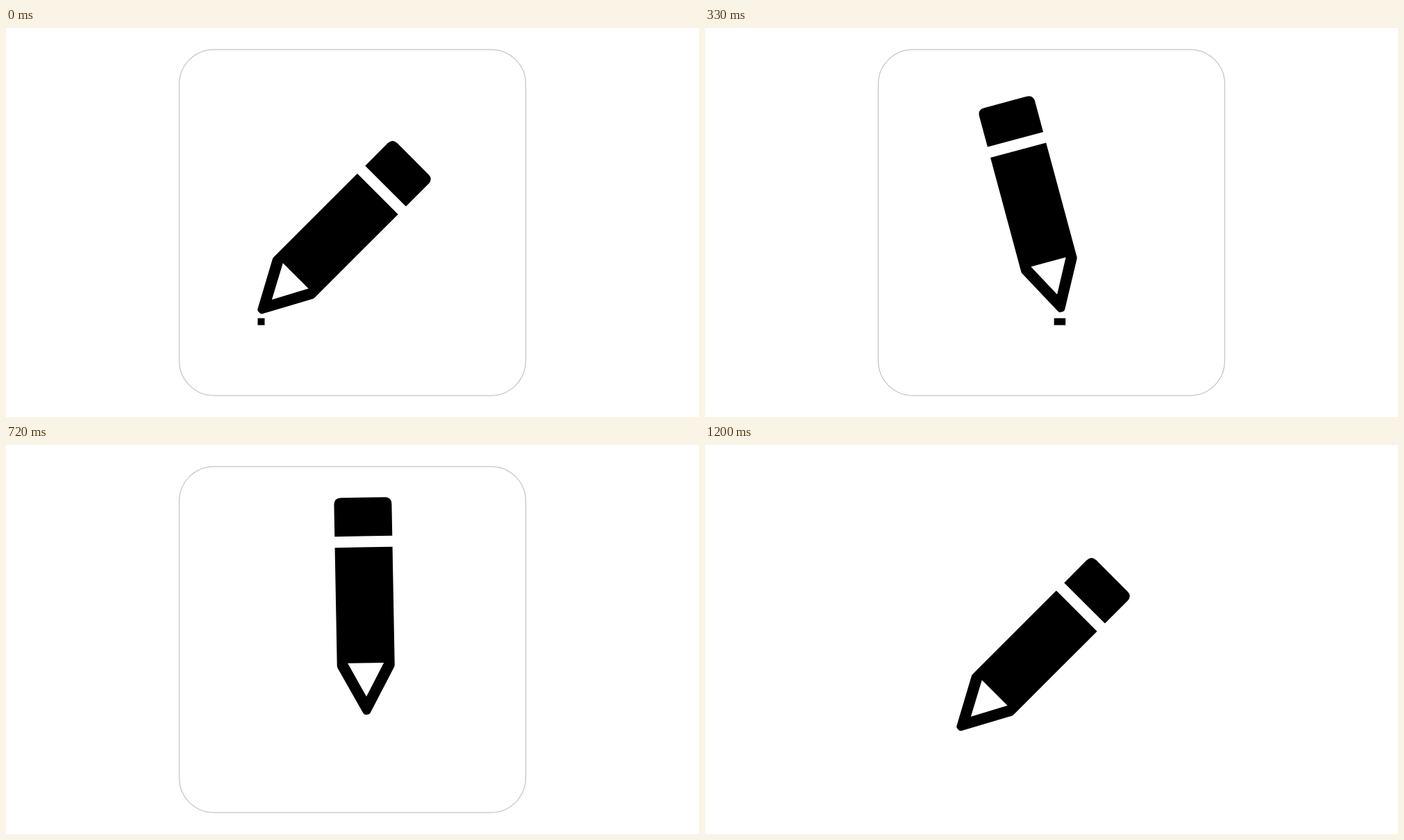
Write an HTML page that moves like this. It is 998 by 561 pixels and loops after 3150 ms.

```html
<!DOCTYPE html>
<html lang="en">
<head>
<meta charset="utf-8">
<title>Pencil</title>
<style>
  html, body { margin: 0; width: 100%; height: 100%; overflow: hidden; background: #fff; }
  svg { display: block; width: 100%; height: 100%; }
</style>
</head>
<body>
<svg viewBox="0 0 998 561">
  <g id="extras">
    <rect x="249.5" y="31" width="499" height="499" rx="50" fill="none" stroke="#c4c4c4" stroke-width="1.25"/>
    <rect id="dash" y="418.5" height="10"/>
  </g>
  <!-- The pencil's tip is at its local origin. -->
  <g id="pencil">
    <path d="M-41.5-257.5V-303.2Q-41.5-313.2-31.5-313.2H31.5Q41.5-313.2 41.5-303.2V-257.5Z"/>
    <path fill-rule="evenodd" d="M-41.5-241.5H41.5V-71.5Q41.5-69.5 40.7-68L5.2-2.4Q3.9 0 1.5 0H-1.5Q-3.9 0-5.2-2.4L-40.7-68Q-41.5-69.5-41.5-71.5Z
      M-26-74.5H26L0-26Z"/>
  </g>
</svg>
<script>
  const LOOP = 3150, STEP = 30, REST = 1200, LIFT = 570, RETURN = 870;
  const [extras, dash, pencil] = ['extras', 'dash', 'pencil'].map(id => document.getElementById(id));

  // Tip x, tip y, rotation in degrees
  const home = [364.5, 410.1, 45];
  const drawn = [518.7, 409.4, -17];
  const lifted = [519.6, 387.5, 0];

  const ease = (t, from, to) => {
    const u = Math.min(1, Math.max(0, (t - from) / (to - from)));
    return 1 - (1 - u) ** 4;
  };
  const mix = (a, b, p) => a.map((v, i) => v + (b[i] - v) * p);

  function pose(t) {
    if (t < LIFT) return mix(home, drawn, ease(t, 0, LIFT));
    if (t < RETURN) return mix(drawn, lifted, ease(t, LIFT, RETURN));
    return mix(lifted, home, ease(t, RETURN, REST));
  }

  function draw(t) {
    const [x, y, angle] = pose(t);
    pencil.setAttribute('transform', `translate(${x} ${y}) rotate(${angle})`);

    // The stroke's back end starts later and catches up with its front.
    const front = 151.5 * ease(t, 0, LIFT);
    const back = 151.5 * ease(t, 120, 560);
    dash.setAttribute('x', 362.5 + back);
    dash.setAttribute('width', Math.max(10, front - back + 10));
    dash.style.display = t < LIFT ? '' : 'none';
    extras.style.display = t < REST ? '' : 'none';
  }

  const start = performance.now();
  function tick() {
    const t = (performance.now() - start) % LOOP;
    draw(Math.floor(t / STEP) * STEP);
    requestAnimationFrame(tick);
  }
  tick();
</script>
</body>
</html>
```
